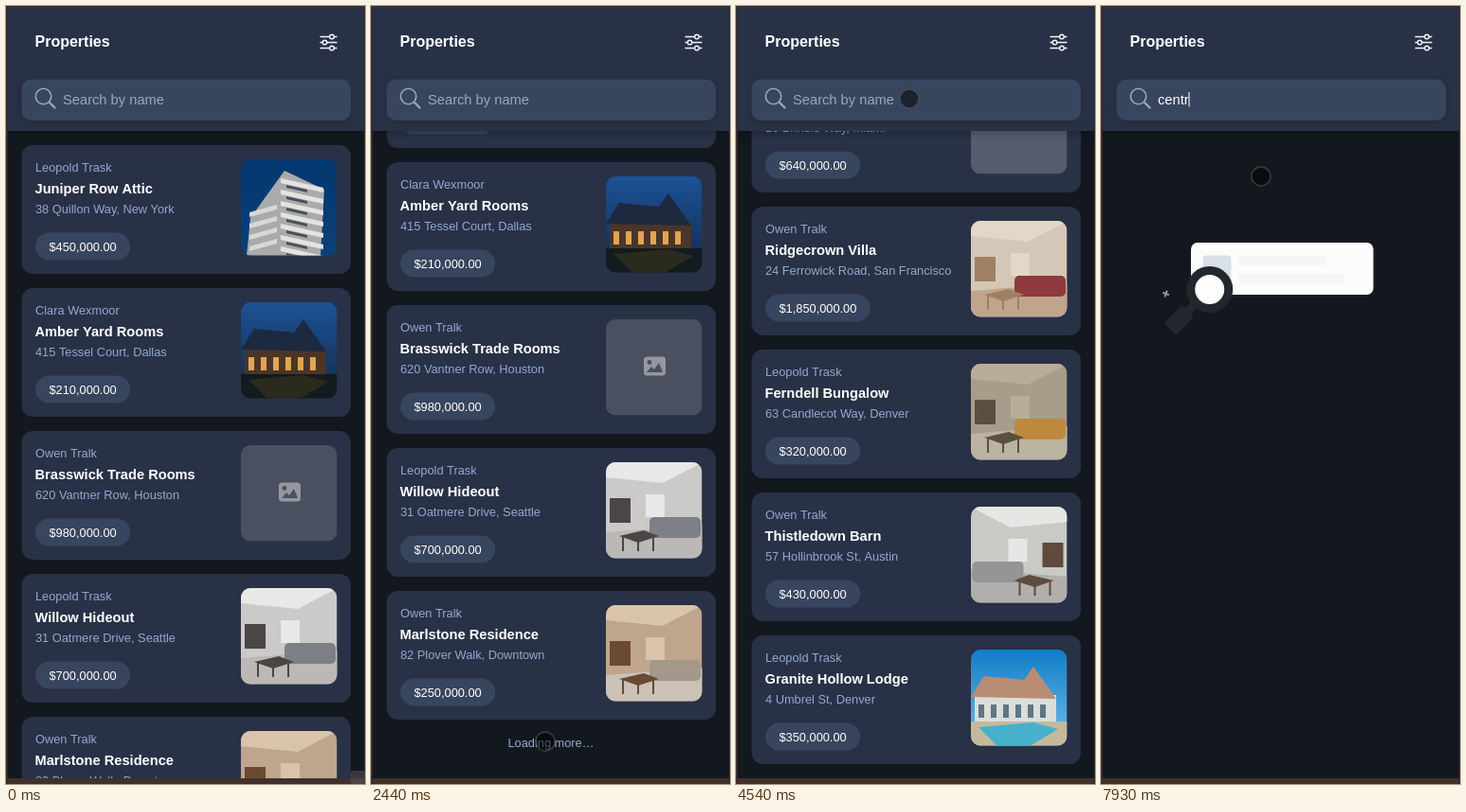
Animation of 379 by 822 pixels, one loop 8 s. Source, as an HTML page with a canvas:

```html
<!DOCTYPE html>
<html lang="en">
<head>
<meta charset="utf-8">
<title>Properties</title>
<style>
  html, body { margin: 0; width: 379px; height: 822px; overflow: hidden; background: #13181f; }
  canvas { display: block; }
</style>
</head>
<body>
<canvas id="stage" width="379" height="822"></canvas>
<script>
const ctx = document.getElementById('stage').getContext('2d');
const LOOP = 8000, W = 379, H = 822, VIEW = 816, HEADER = 132;
const FIRST = 147, CARD = 136, PITCH = 151, LOADER = 47, TILE = 101.5;
const SANS = '"Liberation Sans", Arial, sans-serif';
const BG = '#13181f', PANEL = '#283146', FIELD = '#38455e';
const MUTED = '#94a8cf', HINT = '#9ca7ba', WHITE = '#fff';

// ---------- helpers ----------
const clamp = (v, a, b) => Math.min(b, Math.max(a, v));
const lerp = (a, b, k) => a + (b - a) * k;
const progress = (t, a, b) => clamp((t - a) / (b - a), 0, 1);
const between = (t, a, b) => t >= a && t < b;
const easeIn = k => k * k;
const easeOut = k => 1 - (1 - k) * (1 - k);
const smooth = k => k * k * (3 - 2 * k);

function box(color, x, y, w, h, r = 0) {
  ctx.fillStyle = color;
  ctx.beginPath();
  ctx.roundRect(x, y, w, h, r);
  ctx.fill();
}
function poly(color, ...pts) {
  ctx.fillStyle = color;
  ctx.beginPath();
  for (let i = 0; i < pts.length; i += 2) ctx.lineTo(pts[i], pts[i + 1]);
  ctx.fill();
}
function disc(color, x, y, r) {
  ctx.fillStyle = color;
  ctx.beginPath();
  ctx.arc(x, y, r, 0, Math.PI * 2);
  ctx.fill();
}
function ring(color, x, y, r, width) {
  ctx.strokeStyle = color;
  ctx.lineWidth = width;
  ctx.beginPath();
  ctx.arc(x, y, r, 0, Math.PI * 2);
  ctx.stroke();
}
function line(color, width, x1, y1, x2, y2) {
  ctx.strokeStyle = color;
  ctx.lineWidth = width;
  ctx.beginPath();
  ctx.moveTo(x1, y1);
  ctx.lineTo(x2, y2);
  ctx.stroke();
}
function fill(top, bottom = top) {
  const g = ctx.createLinearGradient(0, 0, 0, TILE);
  g.addColorStop(0, top);
  g.addColorStop(1, bottom);
  box(g, 0, 0, TILE, TILE);
}
function text(str, x, y, size, color, weight = 400, align = 'left') {
  ctx.font = `${weight} ${size}px ${SANS}`;
  ctx.textAlign = align;
  ctx.fillStyle = color;
  ctx.fillText(str, x, y);
}

// ---------- pictures, drawn on a square tile ----------
const tower = () => {
  fill('#04376f', '#0a4078');
  poly('#a9aaab', 6, 102, 10, 62, 46, 12, 88, 32, 84, 102);
  for (let y = 20; y < 102; y += 12) {
    poly('#e4e3df', 42, y, 87, y + 10, 87, y + 15, 42, y + 5);
    poly('#4a5058', 48, y + 7, 70, y + 12, 70, y + 15, 48, y + 10);
    if (y > 50) poly('#d8d7d2', 9, y, 38, y - 8, 38, y - 3, 9, y + 5);
  }
};

const house = (skyTop, skyLow, wall, roof, windows, ground, yard) => () => {
  fill(skyTop, skyLow);
  box(wall, 4, 48, 86, 34);
  poly(roof, 0, 50, 14, 28, 56, 32, 66, 18, 90, 52);
  for (let i = 0; i < 6; i++) box(windows, 8 + i * 13, 58, 6, 14);
  box(ground, 0, 76, TILE, 26);
  poly(yard, 8, 82, 66, 77, 92, 84, 62, 102, 28, 102);
};

const room = (wall, ceiling, floor, sofa, accent, flip) => () => {
  if (flip) ctx.transform(-1, 0, 0, 1, TILE, 0);
  fill(wall);
  poly(ceiling, 0, 0, 102, 0, 60, 22, 0, 16);
  box(ceiling, 42, 34, 20, 24);
  box(accent, 4, 38, 22, 26);
  poly(floor, 0, 74, 102, 66, 102, 102, 0, 102);
  box(sofa, 46, 58, 54, 22, 5);
  poly(accent, 14, 78, 40, 72, 56, 78, 34, 85);
  for (let x = 18; x < 56; x += 16) line(accent, 2, x, 79, x, 94);
};

const emptyTile = () => {
  const tile = '#4a5060';
  fill(tile);
  box('#95989f', 40, 39.5, 23, 20, 3.5);
  disc(tile, 46, 45.5, 2.4);
  poly(tile, 43, 56, 48, 50, 51, 53, 56, 46, 60, 56);
};
const lateTile = t => t < 5500 ? fill('#575c6c') : emptyTile();

// ---------- data ----------
const LEO = 'Leopold Trask', CLARA = 'Clara Wexmoor', OWEN = 'Owen Tralk';
const homes = [
  [LEO, 'Juniper Row Attic', '38 Quillon Way, New York', '$450,000.00', tower],
  [CLARA, 'Amber Yard Rooms', '415 Tessel Court, Dallas', '$210,000.00',
    house('#1c5296', '#12294a', '#4a3528', '#1d293f', '#e3a452', '#121b1d', '#2a2b1d')],
  [OWEN, 'Brasswick Trade Rooms', '620 Vantner Row, Houston', '$980,000.00', emptyTile],
  [LEO, 'Willow Hideout', '31 Oatmere Drive, Seattle', '$700,000.00',
    room('#cccac8', '#e9e8e6', '#bcb8b6', '#7d8086', '#4a4646')],
  [OWEN, 'Marlstone Residence', '82 Plover Walk, Downtown', '$250,000.00',
    room('#bfa58d', '#d9c3ab', '#cbc2b7', '#a39889', '#6b4a34')],
  [CLARA, 'Saltbreeze Duplex', '16 Brindle Way, Miami', '$640,000.00', lateTile],
  [OWEN, 'Ridgecrown Villa', '24 Ferrowick Road, San Francisco', '$1,850,000.00',
    room('#d5c7b7', '#e2d7c9', '#c0a58c', '#8f3a3c', '#a08064')],
  [LEO, 'Ferndell Bungalow', '63 Candlecot Way, Denver', '$320,000.00',
    room('#a89d8a', '#b8ad98', '#bdb3a1', '#bd8a3d', '#5a5042')],
  [OWEN, 'Thistledown Barn', '57 Hollinbrook St, Austin', '$430,000.00',
    room('#c9c9c6', '#e6e6e4', '#b0afab', '#949595', '#5f4a3e', true)],
  [LEO, 'Granite Hollow Lodge', '4 Umbrel St, Denver', '$350,000.00',
    house('#117dca', '#74bee4', '#d9dedb', '#b98d74', '#5f7683', '#c4b99c', '#45b1cc')]
];

// ---------- timeline ----------
const LOADED = 2900, FLING = 3790, FLING_END = 4260, FOCUS = 4890, NO_RESULTS = 6830;
const DRAGS = { first: 880, second: 3390 };

// start, end, x, y and easing; the pointer rests between legs
const legs = [
  [70, 880, 228, 484, smooth],
  [DRAGS.first, 1150, 242, 336, smooth],
  [1740, 2440, 184, 777, smooth],
  [2580, 3320, 190, 760, smooth],
  [DRAGS.second, 3740, 273, 513, easeIn],
  [FLING, 4130, 183, 92, easeOut],
  [4400, 4540, 183, 98, smooth],
  [5170, 5240, 169, 110, smooth],
  [7580, 7930, 169, 180, smooth]
];
function pointerAt(t) {
  let x = 374, y = 818;
  for (const [start, end, toX, toY, ease] of legs) {
    const k = ease(progress(t, start, end));
    x = lerp(x, toX, k);
    y = lerp(y, toY, k);
  }
  return { x, y };
}

const isPressed = t => between(t, DRAGS.first, 1300) || between(t, DRAGS.second, 3700)
  || between(t, 4820, FOCUS);

const maxScroll = count =>
  FIRST + count * PITCH - VIEW + (count < homes.length ? LOADER : 0);
const shownCount = t => t < LOADED ? 5 : homes.length;

// The list follows the pointer 1:1 while dragged, then coasts to its end.
function scrollAt(t) {
  const dragged = (from, now) => pointerAt(from).y - pointerAt(now).y;
  if (t < DRAGS.first) return 0;
  const rest = maxScroll(5);
  if (t < DRAGS.second) return Math.min(rest, dragged(DRAGS.first, Math.min(t, 1150)));
  const released = rest + dragged(DRAGS.second, Math.min(t, FLING));
  return lerp(released, maxScroll(homes.length), easeOut(progress(t, FLING, FLING_END)));
}

const WORD = 'centr', keyTimes = [5500, 5570, 5770, 5900, 6510];

// ---------- scene ----------
function card([owner, title, address, price, picture], y, t) {
  box(PANEL, 16.5, y, 347.5, CARD, 12);
  text(owner, 31, y + 28, 12.8, MUTED);
  text(title, 30.5, y + 51, 14.65, WHITE, 700);
  text(address, 31, y + 72, 12.8, MUTED);
  ctx.font = `400 12.8px ${SANS}`;
  box(FIELD, 31, y + 92.5, ctx.measureText(price).width + 29, 29, 14.5);
  text(price, 45.5, y + 112, 12.8, WHITE);
  ctx.save();
  ctx.translate(248, y + 15);
  ctx.beginPath();
  ctx.roundRect(0, 0, TILE, TILE, 10);
  ctx.clip();
  picture(t);
  ctx.restore();
}

function list(t) {
  const scroll = scrollAt(t), count = shownCount(t);
  homes.slice(0, count).forEach((home, i) => {
    const y = FIRST + i * PITCH - scroll;
    if (between(y, -CARD, VIEW)) card(home, y, t);
  });
  if (count < homes.length) text('Loading more…', 190, 916 - scroll, 12.8, MUTED, 400, 'center');
}

function scrollbar(t) {
  const [shown, hidden] = t < LOADED ? [DRAGS.first, 1680] : [DRAGS.second, 4540];
  if (!between(t, shown, hidden)) return;
  const ratio = VIEW / (VIEW + maxScroll(shownCount(t)));
  ctx.globalAlpha = progress(t, hidden, hidden - 140);
  box('#50545d', 375, scrollAt(t) * ratio + 1, 4, VIEW * ratio - 4, 1);
  ctx.globalAlpha = 1;
}

function magnifier(x, y, angle) {
  const dark = '#20272d';
  ctx.save();
  ctx.translate(x, y);
  ctx.rotate(angle);
  box(dark, 22, -4.5, 14, 9);
  box(dark, 32, -9, 27, 18, 4);
  disc(dark, 0, 0, 24.5);
  disc('#fdfdfd', 0, 0, 15.5);
  ctx.restore();
}

function sparkle(x, y, alpha) {
  ctx.save();
  ctx.globalAlpha = alpha;
  ctx.translate(x, y);
  ctx.rotate(.35);
  line('#8496a6', 2, -3.5, 0, 3.5, 0);
  line('#8496a6', 2, 0, -3.5, 0, 3.5);
  ctx.restore();
}

function noResults(t) {
  const k = smooth(progress(t, NO_RESULTS, 7930));
  box('#1a2026', 94, 249.5, 195, 57, 8);
  box('#fcfcfc', 95, 250, 192.5, 55, 7);
  box('#d9e0e8', 107.5, 263.5, 30, 30, 4);
  box('#f5f5f6', 144.5, 264, 94, 10.5, 5);
  box('#f5f5f6', 144.5, 282.5, 113, 10.5, 5);
  magnifier(lerp(281.5, 114.7, k), lerp(238, 299.5, k), lerp(.25, .75, k) * Math.PI);
  sparkle(68.5, 304, progress(t, 7700, 7900));
}

function shadowed(alpha, blur, offset, drawShape) {
  ctx.save();
  ctx.shadowColor = `rgba(0,0,0,${alpha})`;
  ctx.shadowBlur = blur;
  ctx.shadowOffsetY = offset;
  drawShape();
  ctx.restore();
}

function searchField(t) {
  shadowed(.14, 6, 2, () => box(FIELD, 16.5, 77.5, 347.5, 43.5, 10));
  ring(HINT, 39.5, 95.5, 8.2, 1.6);
  ctx.lineCap = 'round';
  line(HINT, 2.4, 46, 102, 51.5, 107.5);
  ctx.lineCap = 'butt';

  const pressedKeys = keyTimes.filter(at => t >= at);
  const typed = WORD.slice(0, pressedKeys.length);
  text(typed || 'Search by name', 60, 104, 14.7, typed ? WHITE : HINT);
  const idle = t - (pressedKeys.pop() ?? FOCUS);
  if (idle >= 0 && idle % 1060 < 530) {
    box(WHITE, Math.round(60 + ctx.measureText(typed).width) - .5, 91, 1, 15.5);
  }
}

function header(t) {
  shadowed(.25, 9, 2, () => box(PANEL, 0, 0, W, HEADER));
  text('Properties', 30.5, 43, 16, WHITE, 700);
  for (let i = 0; i < 3; i++) {
    const y = 32.5 + i * 6, knob = i === 1 ? 336.5 : 344;
    line('#f2f4f7', 1.5, 331.5, y, 349.5, y);
    disc(PANEL, knob, y, 2.3);
    ring('#f2f4f7', knob, y, 2.3, 1.4);
  }
  searchField(t);
}

function frameEdges() {
  box('#41302a', 0, VIEW, W, H - VIEW);
  box('#392c2a', 0, 0, 1.7, H);
  box('#302c30', 0, 0, W, 1);
  box('#292a30', 378, 0, 1, H);
}

function pointer(t) {
  if (t < 70) {
    box('rgba(100,88,92,.5)', 364, 808, 15, 14, 2);
    return;
  }
  const { x, y } = pointerAt(t);
  if (isPressed(t)) {
    disc('#898a19', x, y, 11);
    ring('#a2a322', x, y, 11, 2);
  } else {
    disc('rgba(0,0,0,.5)', x, y, 10);
    ring('rgba(88,88,90,.6)', x, y, 10, 1.4);
  }
}

function draw(t) {
  const searching = t < NO_RESULTS;
  box(BG, 0, 0, W, H);
  if (searching) list(t);
  else noResults(t);
  header(t);
  if (searching) scrollbar(t);
  frameEdges();
  pointer(t);
}

const start = performance.now();
function tick() {
  draw((performance.now() - start) % LOOP);
  requestAnimationFrame(tick);
}
tick();
</script>
</body>
</html>
```
